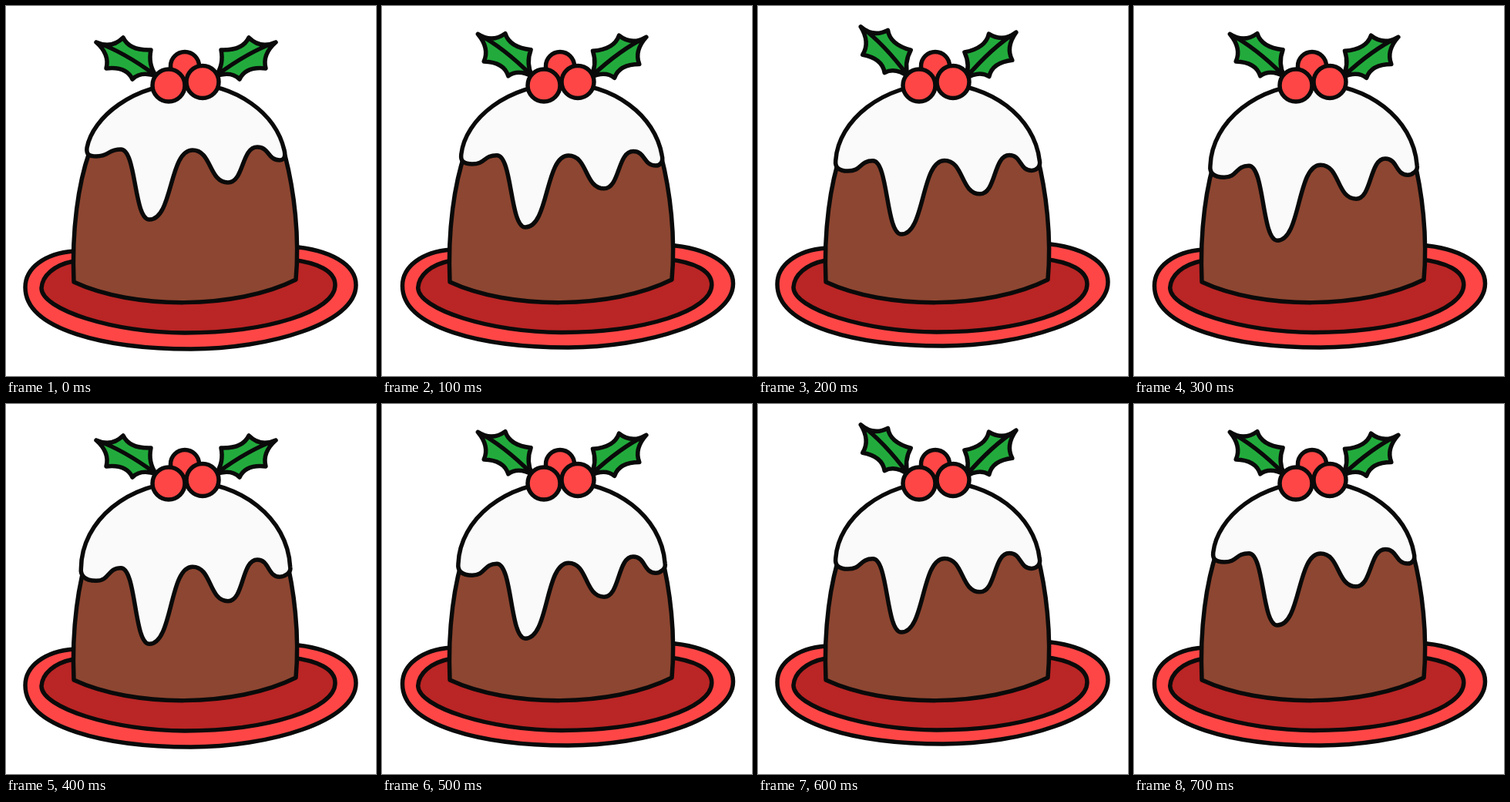
Animation of 480 by 480 pixels, one loop 800 ms. Source, as an HTML page with a canvas:

```html
<!DOCTYPE html>
<html lang="en">
<head>
<meta charset="utf-8">
<title>Christmas pudding</title>
<style>
html, body { margin: 0; width: 100%; height: 100%; overflow: hidden; background: #fff; }
canvas { display: block; }
</style>
</head>
<body>
<canvas id="stage" width="480" height="480"></canvas>
<script>
const ctx = document.getElementById('stage').getContext('2d');
const RED = '#ff4646', DARK = '#ba2525', BROWN = '#8d4631', WHITE = '#fafafa', GREEN = '#22ab3c';

const rim = new Path2D('M88 318C50 321 25 340 25 365C25 420 130 445 240 445C340 445 454 412 454 362C454 335 420 316 370 312Z');
const dish = new Path2D('M88 331C62 336 47 350 46 366C46 394 140 424 232 424C340 424 427 396 427 362C427 344 405 333 370 329Z');
const body = new Path2D('M108 190C94 230 85 290 88 358C165 394 298 394 376 355C381 300 374 240 362 194L235 130Z');
const leaf = new Path2D('M-75-41Q-55-32-40-47Q-32-30-4-31Q-8-12 3 3Q-17-4-28 7Q-36-10-62-7Q-57-25-75-41ZQ-40-29 2 2');

// Lower edge of the icing from right to left: x, y and how far each turning point sinks
const edge = [
  [355, 200, 19], [326, 183, 15], [288, 229, 21], [242, 187, 19],
  [186, 277, 27], [149, 186, 21], [117, 195, 27]
];

function icing(k) {
  const path = new Path2D();
  const left = [105 - 6 * k, 184 + 23 * k], right = [361 + 6 * k, 187 + 19 * k];
  path.moveTo(...left);
  path.bezierCurveTo(112 - 11 * k, 145 + 5 * k, 165 - 5 * k, 101, 235, 101);
  path.bezierCurveTo(300 + 2 * k, 101, 350 + 12 * k, 140 + 5 * k, ...right);
  let [x, y] = right;
  edge.forEach(([ex, ey, sink], i) => {
    const ny = ey + sink * k;
    if (i) {
      const bend = (ex - x) * .55;
      path.bezierCurveTo(x + bend, y, ex - bend, ny, ex, ny);
    } else {
      path.bezierCurveTo(x + 2, y + 8, ex + 6, ny, ex, ny);
    }
    [x, y] = [ex, ny];
  });
  path.bezierCurveTo(x - 10 - 5 * k, y, left[0] - 1, left[1] + 8, ...left);
  return path;
}

function paint(path, color, x = 0, y = 0, side = 1, turn = 0) {
  ctx.save();
  ctx.translate(x, y);
  ctx.scale(side, 1);
  ctx.rotate(turn * Math.PI / 180);
  ctx.fillStyle = color;
  ctx.fill(path);
  ctx.stroke(path);
  ctx.restore();
}

function berry(x, y, r) {
  const path = new Path2D();
  path.arc(x, y, r, 0, 2 * Math.PI);
  paint(path, RED);
}

// step runs from 0 (icing high) to 4 (icing low)
function draw(step) {
  const lift = 2 - Math.abs(step - 2);
  const drip = .39 * step - .018 * step * step;
  const sway = step % 2 * 1.5;
  ctx.clearRect(0, 0, 480, 480);
  ctx.strokeStyle = '#0a0a0a';
  ctx.lineWidth = 5.5;
  ctx.lineJoin = ctx.lineCap = 'round';
  paint(rim, RED, sway, -2 * lift);
  paint(dish, DARK, sway / 2, -lift / 2);
  paint(body, BROWN);
  paint(icing(drip), WHITE);
  paint(leaf, GREEN, 192 + lift / 2, 88, 1, 8.5 * lift);
  paint(leaf, GREEN, 275 - 2 * lift, 88 + 1.5 * lift, -1, 6.5 * lift);
  berry(232 - lift, 78, 18.5);
  berry(211 - lift, 103, 21);
  berry(255 - lift, 98.5, 21);
}

function tick() {
  const frame = Math.floor(performance.now() / 100) % 8;
  draw(4 - Math.abs(frame - 4));
  requestAnimationFrame(tick);
}
tick();
</script>
</body>
</html>
```
